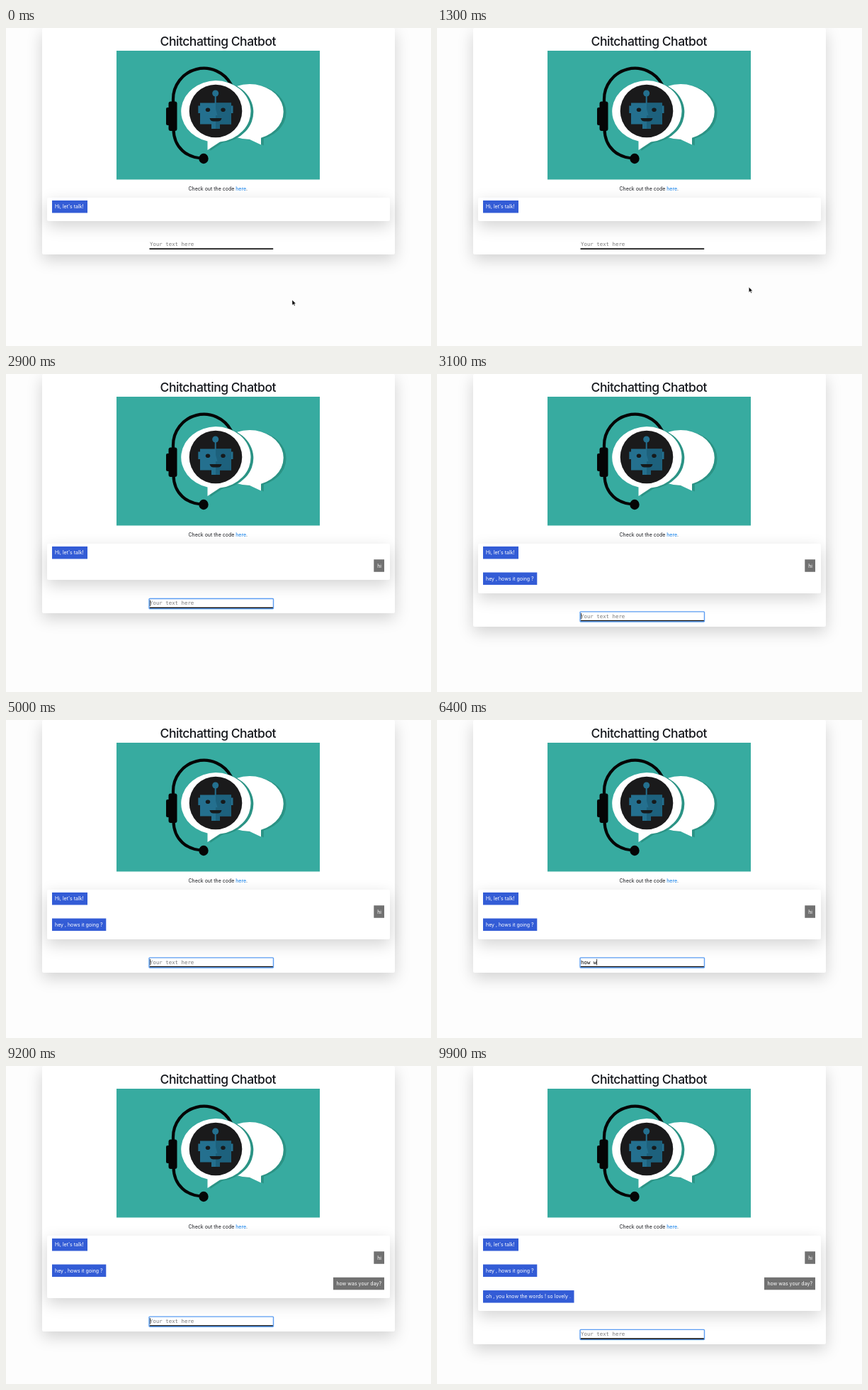
Recreate the animation shown at these times as an HTML page. Size 600 by 448 pixels, loop 10 s.

```html
<!DOCTYPE html>
<html lang="en">
<head>
<meta charset="utf-8">
<title>Chitchatting Chatbot</title>
<style>
  html, body { margin: 0; width: 100%; height: 100%; overflow: hidden; background: #fdfdfd; }
  #stage { position: relative; width: 600px; height: 448px; overflow: hidden; }
  #card, #chat {
    position: absolute; background: #fff; border-radius: 2px;
    box-shadow: 0 7.3px 22px rgba(0, 0, 0, .175);
  }
  #card { left: 50.5px; top: 0; width: 498.3px; }
  #chat { left: 57.5px; top: 239px; width: 484px; }
  svg { position: absolute; left: 0; top: 0; }
  text { font: 7px Inter, sans-serif; white-space: pre; }
  .title { font-size: 17.5px; font-weight: 500; letter-spacing: -.48px; font-optical-sizing: none; fill: #16181d; }
  .mono { font: 7.4px "DejaVu Sans Mono", monospace; }
</style>
</head>
<body>
<div id="stage">
  <div id="card"></div>
  <div id="chat"></div>
  <svg width="600" height="448" viewBox="0 0 600 448">
    <defs>
      <path id="back" d="M344 79a48 39 0 0 1 16 75.7V164.500L344 157a48 39 0 0 1 0-78Z"/>
      <path id="front" d="M296 74a50.300 43.500 0 0 1 6 86.600L284.500 172V159.500A50.300 43.500 0 0 1 296 74Z"/>
    </defs>
    <text class="title" x="299.300" y="24.500" text-anchor="middle">Chitchatting Chatbot</text>

    <rect x="156" y="32" width="287" height="181.500" fill="#37aba0"/>
    <use href="#back" x="3.800" y="1" fill="#2b9385"/>
    <use href="#back" fill="#fff"/>
    <g fill="none" stroke="#050505" stroke-width="4.200">
      <path d="M236 105V101A43.500 43.500 0 0 1 318 80"/>
      <path d="M236.500 143C237 168 255 183.500 279 183.500"/>
    </g>
    <use href="#front" x="3.800" y="1" fill="#2b9385"/>
    <use href="#front" fill="#fff"/>
    <g fill="#050505">
      <rect x="229.500" y="103.500" width="12" height="41.500" rx="3"/>
      <rect x="226" y="112" width="6" height="25" rx="2"/>
      <ellipse cx="279" cy="184" rx="6.700" ry="7.200"/>
    </g>

    <circle cx="296" cy="117" r="37.300" fill="#1a1a1b"/>
    <g fill="#24708f">
      <circle cx="295.700" cy="92" r="4.500"/>
      <rect x="294.700" y="95" width="2" height="11"/>
      <rect x="271.300" y="109.500" width="4" height="10.500"/>
      <rect x="316.500" y="109.500" width="4" height="10.500"/>
      <path d="M274 105.500H318V135.500H302V142H290V135.500H274Z"/>
    </g>
    <path d="M296 105.500H318V135.500H302V142H296V123H298.500L296 114Z" fill="#1d617d"/>
    <g fill="#161a1c">
      <ellipse cx="285" cy="115.300" rx="3.200" ry="2.800"/>
      <ellipse cx="306.500" cy="115.300" rx="3.200" ry="2.800"/>
      <path d="M287.500 127H304.500Q303.500 131.500 299 131.500H293Q288.500 131.500 287.500 127Z"/>
    </g>

    <text x="299.300" y="228.700" text-anchor="middle" fill="#16181d">Check out the code <tspan fill="#0a7be8">here</tspan>.</text>

    <g id="log"></g>

    <g id="field">
      <rect x="202.500" y="310.300" width="174.700" height="1.700" fill="#111"/>
      <rect id="ring" x="202" y="298.300" width="175.500" height="14.200" rx="1" fill="none" stroke="#5b9df2" stroke-width="1.400"/>
      <text id="typed" class="mono" x="203" y="307.200"></text>
      <rect id="caret" y="300.300" width=".8" height="8.500" fill="#111"/>
    </g>
    <path id="pointer" d="M0 0V7.500L1.800 5.900 3 8.600 4.200 8.100 3 5.500H5.300Z" fill="#000" stroke="#fff" stroke-width=".5"/>
  </svg>
</div>
<script>
const LOOP = 10000, PITCH = 18.27, CHAR = 4.455, FOCUS = 1900, HIDE = 2300;
const NS = 'http://www.w3.org/2000/svg';
const $ = id => document.getElementById(id);

// start time, text, bubble width, sent by the user
const messages = [
  [0, "Hi, let's talk!", 50, false],
  [2900, 'hi', 14.7, true],
  [3000, 'hey , hows it going ?', 76.3, false],
  [9000, 'how was your day?', 72, true],
  [9500, 'oh , you know the words ! so lovely .', 128.5, false]
];

// text to type, time of each key, time of sending
const inputs = [
  ['hi', [2300, 2700], 2900],
  ['how was your day?', [5200, 5500, 5700, 5900, 6300, 6900, 7000, 7200,
    7500, 7600, 7700, 7900, 8000, 8100, 8200, 8400, 8900], 9000]
];

const mouse = [[0, 404, 383], [100, 404, 383], [1100, 482, 376], [1900, 215, 305], [2100, 197, 317.5], [2300, 197, 317.5]];

function add(parent, tag, attrs) {
  const el = document.createElementNS(NS, tag);
  for (const key in attrs) el.setAttribute(key, attrs[key]);
  return parent.appendChild(el);
}

const bubbles = messages.map(([, text, width, own], i) => {
  const g = add($('log'), 'g', {});
  const y = 243 + PITCH * i;
  add(g, 'rect', { x: own ? 534 - width : 65, y, width, height: 17.5, fill: own ? '#717171' : '#335cd6' });
  add(g, 'text', { x: own ? 530 : 69, y: y + 11.3, fill: '#fff', 'text-anchor': own ? 'end' : 'start' })
    .textContent = text;
  return g;
});

function mouseAt(t) {
  const i = Math.max(1, mouse.findIndex(p => p[0] > t));
  const [t0, x0, y0] = mouse[i - 1], [t1, x1, y1] = mouse[i];
  const p = (t - t0) / (t1 - t0), e = p * p * (3 - 2 * p);
  return [x0 + (x1 - x0) * e, y0 + (y1 - y0) * e];
}

function fieldAt(t) {
  let text = '', last = FOCUS;
  for (const [full, keys, sent] of inputs) {
    const past = keys.filter(k => k <= t);
    if (past.length) last = past[past.length - 1];
    if (t >= sent) last = sent;
    else text += full.slice(0, past.length);
  }
  return { text, caret: t >= FOCUS && (t - last) % 1000 < 500 };
}

function show(el, on) {
  el.style.display = on ? '' : 'none';
}

function draw(now) {
  const t = Math.floor(now % LOOP / 100) * 100;
  const count = messages.filter(m => m[0] <= t).length;
  const grow = PITCH * (count - 1);
  $('card').style.height = 319 + grow + 'px';
  $('chat').style.height = 33 + grow + 'px';
  $('field').setAttribute('transform', `translate(0 ${grow})`);
  bubbles.forEach((b, i) => show(b, i < count));

  const { text, caret } = fieldAt(t);
  $('typed').textContent = text || 'Your text here';
  $('typed').setAttribute('fill', text ? '#000' : '#7b7b7b');
  $('caret').setAttribute('x', 203 + CHAR * text.length);
  show($('caret'), caret);
  show($('ring'), t >= FOCUS);

  show($('pointer'), t < HIDE);
  if (t < HIDE) $('pointer').setAttribute('transform', `translate(${mouseAt(t)})`);
}

const start = performance.now();
function tick() {
  draw(performance.now() - start);
  requestAnimationFrame(tick);
}
tick();
</script>
</body>
</html>
```
